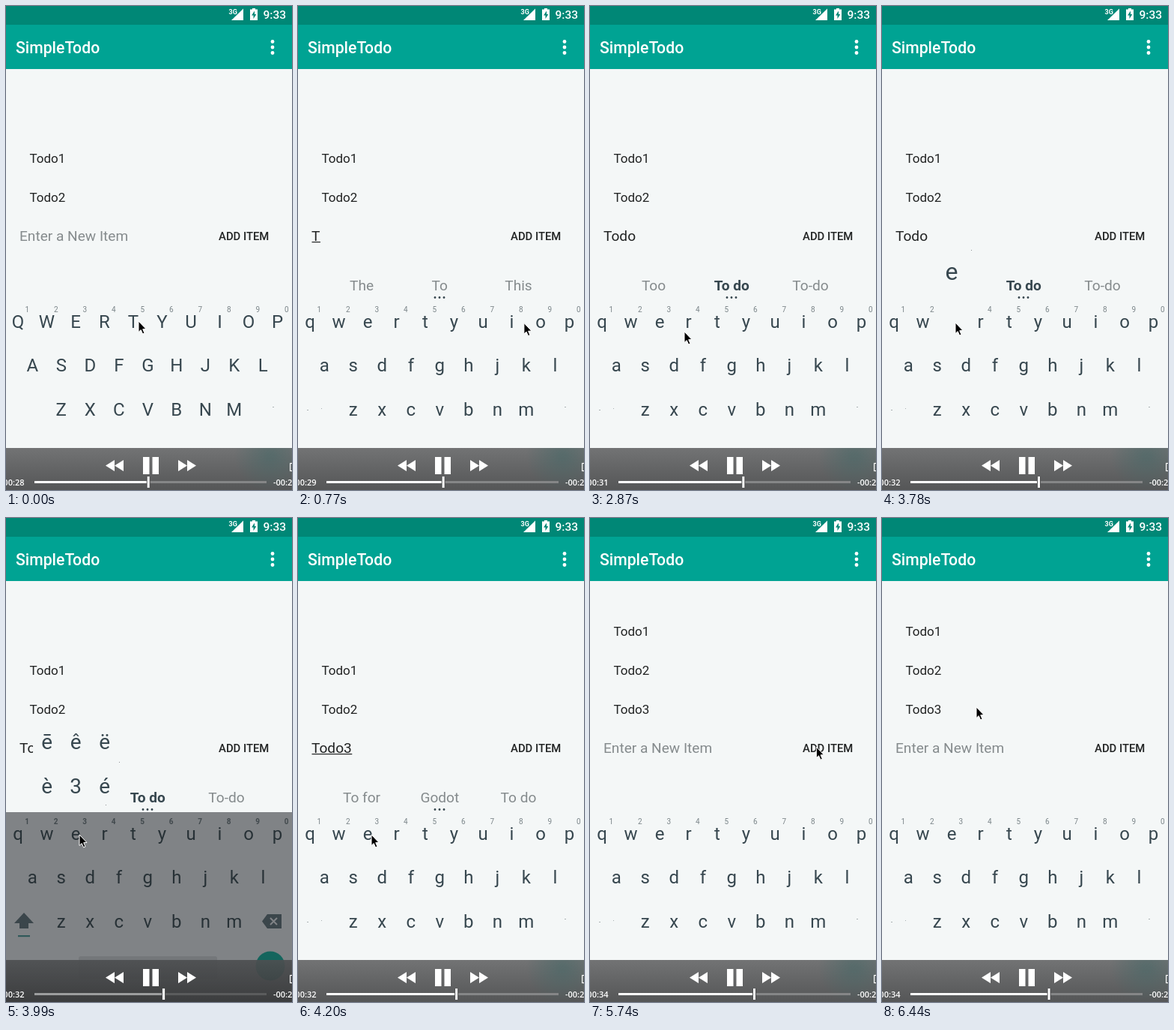
Write an HTML page with a canvas that moves like this. It is 382 px wide and 645 px high and loops after 6.51 s.

```html
<!DOCTYPE html>
<html lang="en">
<head>
<meta charset="utf-8">
<title>Todo list</title>
<style>
html, body { margin: 0; width: 100%; height: 100%; overflow: hidden; background: #f4f7f7; }
canvas { display: block; }
</style>
</head>
<body>
<canvas id="stage" width="382" height="645"></canvas>
<script>
const ctx = document.getElementById('stage').getContext('2d');
const LOOP = 6510, STEP = 70;
const BG = '#f4f7f7', INK = '#37474f', DARK = '#212323', GREY = '#858b8d';
const LONG_PRESS = 3850, ADDED = 5320;

// Keyboard rows: letters, first centre, baseline
const ROWS = [['qwertyuiop', 16, 429], ['asdfghjkl', 35.3, 487], ['zxcvbnm', 73.8, 546]];
const GAP = 38.5;

// Pressed keys: letter, from, to
const PRESSES = [['t', 70, 280], ['o', 1050, 1190], ['d', 1680, 1820], ['o', 2240, 2380], ['e', 3430, 3850]];

// Input states: time, text, suggestions, composing
const STATES = [
  [0, '', [], false],
  [280, 'T', ['The', 'To', 'This'], true],
  [1190, 'To', ['Two', 'Go', 'Too'], true],
  [1820, 'Tod', ['Today', 'Too', 'To do'], true],
  [2380, 'Todo', ['Too', 'To do', 'To-do'], false],
  [4200, 'Todo3', ['To for', 'Godot', 'To do'], true],
  [ADDED, '', [], false]
];

// Pointer stops: time, x, y
const PATH = [
  [0, 177, 420], [350, 177, 420], [910, 325, 423], [1400, 325, 423], [1610, 118, 470],
  [1820, 118, 470], [2170, 326, 424], [2400, 326, 424], [2870, 126, 434], [3360, 98, 422],
  [4270, 98, 422], [4900, 327, 320], [5180, 335, 315], [5600, 335, 315], [6160, 126, 252], [LOOP, 126, 252]
];

function rect(x, y, w, h, color) {
  ctx.fillStyle = color;
  ctx.fillRect(x, y, w, h);
}

function poly(points, color) {
  ctx.beginPath();
  points.forEach(p => ctx.lineTo(p[0], p[1]));
  ctx.closePath();
  ctx.fillStyle = color;
  ctx.fill();
}

function dot(x, y, r, color) {
  ctx.beginPath();
  ctx.arc(x, y, r, 0, 7);
  ctx.fillStyle = color;
  ctx.fill();
}

function text(str, x, y, size, color, align = 'left', weight = 400, family = 'Roboto') {
  ctx.font = `${weight} ${size}px ${family}, sans-serif`;
  ctx.textAlign = align;
  ctx.fillStyle = color;
  ctx.fillText(str, x, y);
}

function drawHeader() {
  rect(0, 0, 382, 25, '#008776');
  rect(0, 25, 382, 59, '#00a393');
  text('3G', 297.5, 11, 9, '#fff', 'left', 700);
  poly([[301, 19], [317, 3.5], [317, 19]], '#fff');
  rect(329, 3, 4, 2, '#fff');
  rect(326, 4.5, 10, 14.5, '#fff');
  poly([[332, 6.5], [328, 12.5], [330.5, 12.5], [330.5, 17], [334.3, 11], [332, 11]], '#008776');
  text('9:33', 343.5, 17, 15.5, '#fff', 'left', 500);
  text('SimpleTodo', 13, 63, 21.2, '#fff', 'left', 500);
  [47.5, 55, 62.5].forEach(y => dot(356, y, 2.4, '#fff'));
}

function drawList(t, [, input, words, composing]) {
  const items = t < ADDED ? ['Todo1', 'Todo2'] : ['Todo1', 'Todo2', 'Todo3'];
  items.forEach((item, i) => text(item, 31.5, 261 - 52 * (items.length - 1 - i), 17, DARK));
  text(input || 'Enter a New Item', 18, 312.5, 19.1, input ? DARK : GREY);
  if (composing) rect(18.5, 314, ctx.measureText(input).width, 1.2, DARK);
  text('ADD ITEM', 284, 312, 14.85, DARK, 'left', 500);

  words.forEach((word, i) => {
    const strong = input === 'Todo' && i === 1;
    text(word, [85, 189.3, 294.5][i], 379, 19.1, strong ? INK : GREY, 'center', strong ? 700 : 400);
  });
  if (words.length) [183, 189, 195].forEach(x => dot(x, 388.5, 1.4, INK));
}

function drawKeys(t, dim) {
  const upper = t < 280;
  const color = dim ? '#273136' : INK;
  if (dim) {
    rect(0, 392, 382, 253, '#808386');
    poly([[24, 526], [37, 540], [30, 540], [30, 547], [18, 547], [18, 540], [11, 540]], '#3b464b');
    rect(16, 556, 16, 2.2, '#30595a');
    poly([[342, 537.5], [349, 528], [368, 528], [368, 547], [349, 547]], '#3b464b');
    ctx.strokeStyle = '#808386';
    ctx.lineWidth = 2;
    ctx.beginPath();
    ctx.moveTo(353, 533); ctx.lineTo(362, 542);
    ctx.moveTo(362, 533); ctx.lineTo(353, 542);
    ctx.stroke();
    ctx.beginPath();
    ctx.roundRect(97, 584, 185, 30, 3);
    ctx.fillStyle = '#74777a';
    ctx.fill();
    dot(353, 597, 19.5, '#14655d');
  } else {
    rect(356, 534, 2, 1, '#a9b0b2');
    if (!upper) {
      rect(12, 538, 2, 1, '#a9b0b2');
      rect(31, 536, 1, 1, '#a9b0b2');
    }
  }
  ROWS.forEach(([letters, x, y], row) => [...letters].forEach((c, i) => {
    text(upper ? c.toUpperCase() : c, x + GAP * i, y, 24, color, 'center');
    if (!row) text((i + 1) % 10, 28.2 + GAP * i, 408, 10, dim ? '#41494d' : '#7b8589', 'center', dim ? 700 : 400);
  }));
}

function drawPopup(t, dim) {
  if (dim) {
    rect(36, 275, 116, 112, BG);
    ['ēêë', 'è3é'].forEach((row, r) => [...row].forEach((c, i) =>
      text(c, 54.7 + GAP * i, 308 + 59 * r, 28, INK, 'center')));
    rect(151, 325, 1, 1, '#8b9092');
    rect(133, 382, 1, 1, '#8b9092');
    return;
  }
  const press = PRESSES.find(p => t >= p[1] && t < p[2]);
  if (!press) return;
  const [letters, x0, y] = ROWS.find(r => r[0].includes(press[0]));
  const x = x0 + GAP * letters.indexOf(press[0]);
  rect(x - 19, y - 30, 38, 38, BG);
  rect(x - 26, y - 104, 52, 72, BG);
  rect(x + 26, y - 104, 1, 1, '#8b9092');
  text(t < 280 ? press[0].toUpperCase() : press[0], x, y - 64, 32, INK, 'center');
}

function drawPlayer(t, dim) {
  const shade = ctx.createLinearGradient(0, 589, 0, 645);
  shade.addColorStop(0, dim ? '#4d4f51' : '#727374');
  shade.addColorStop(1, dim ? '#363738' : '#555657');
  if (dim) ctx.globalAlpha = 0.92;
  rect(0, 589, 382, 56, shade);
  ctx.globalAlpha = 1;
  if (!dim) {
    const tint = ctx.createRadialGradient(353, 600, 4, 353, 600, 48);
    tint.addColorStop(0, 'rgba(70,104,103,.55)');
    tint.addColorStop(1, 'rgba(70,104,103,0)');
    rect(300, 589, 82, 56, tint);
  }

  [133, 145].forEach(x => poly([[x, 612.5], [x + 12, 605], [x + 12, 620]], '#fff'));
  [230, 242].forEach(x => poly([[x, 605], [x + 12, 612.5], [x, 620]], '#fff'));
  rect(183, 601, 8.5, 23, '#fff');
  rect(195.5, 601, 8.5, 23, '#fff');
  ctx.strokeStyle = '#fff';
  ctx.lineWidth = 1.2;
  ctx.strokeRect(379.6, 609.5, 20, 10);

  const x = 190.2 + t * 0.0051;
  rect(38, 633, 310, 3, dim ? '#5b5c5d' : '#858687');
  rect(38, 633, x - 38, 3, dim ? '#9c9d9e' : '#fff');
  rect(x - 2.5, 627, 5, 15, '#4d4e4f');
  rect(x - 1.5, 627, 3, 15, '#fff');

  const seconds = Math.floor(28.45 + t / 1000);
  text('00:' + seconds, 24.5, 639, 11, '#fff', 'right', 600, 'Open Sans');
  text('-00:2', 357, 639, 11, '#fff', 'left', 600, 'Open Sans');
}

function drawPointer(t) {
  const i = PATH.findIndex(p => p[0] > t);
  const [t0, x0, y0] = PATH[i - 1], [t1, x1, y1] = PATH[i];
  const u = (t - t0) / (t1 - t0), k = u * u * (3 - 2 * u);
  ctx.save();
  ctx.translate(x0 + (x1 - x0) * k, y0 + (y1 - y0) * k);
  poly([[0, 0], [0, 14.5], [3.2, 11.6], [5.6, 17], [8, 16], [5.7, 10.7], [10, 10.5]], '#000');
  ctx.strokeStyle = '#fff';
  ctx.lineWidth = 1;
  ctx.stroke();
  ctx.restore();
}

function draw(now) {
  let t = Math.floor(now % LOOP / STEP) * STEP;
  if (t >= 3850 && t < 4200) t = t < 3990 ? 3850 : 3990; // held while the long press is open
  const dim = t >= LONG_PRESS && t < 4200;
  const state = STATES.filter(s => s[0] <= t).pop();
  rect(0, 0, 382, 645, BG);
  drawHeader();
  drawList(t, state);
  drawKeys(t, dim);
  drawPopup(t, dim);
  drawPlayer(t, dim);
  drawPointer(t);
}

const start = performance.now();
function frame() {
  draw(performance.now() - start);
  requestAnimationFrame(frame);
}
frame();
</script>
</body>
</html>
```
